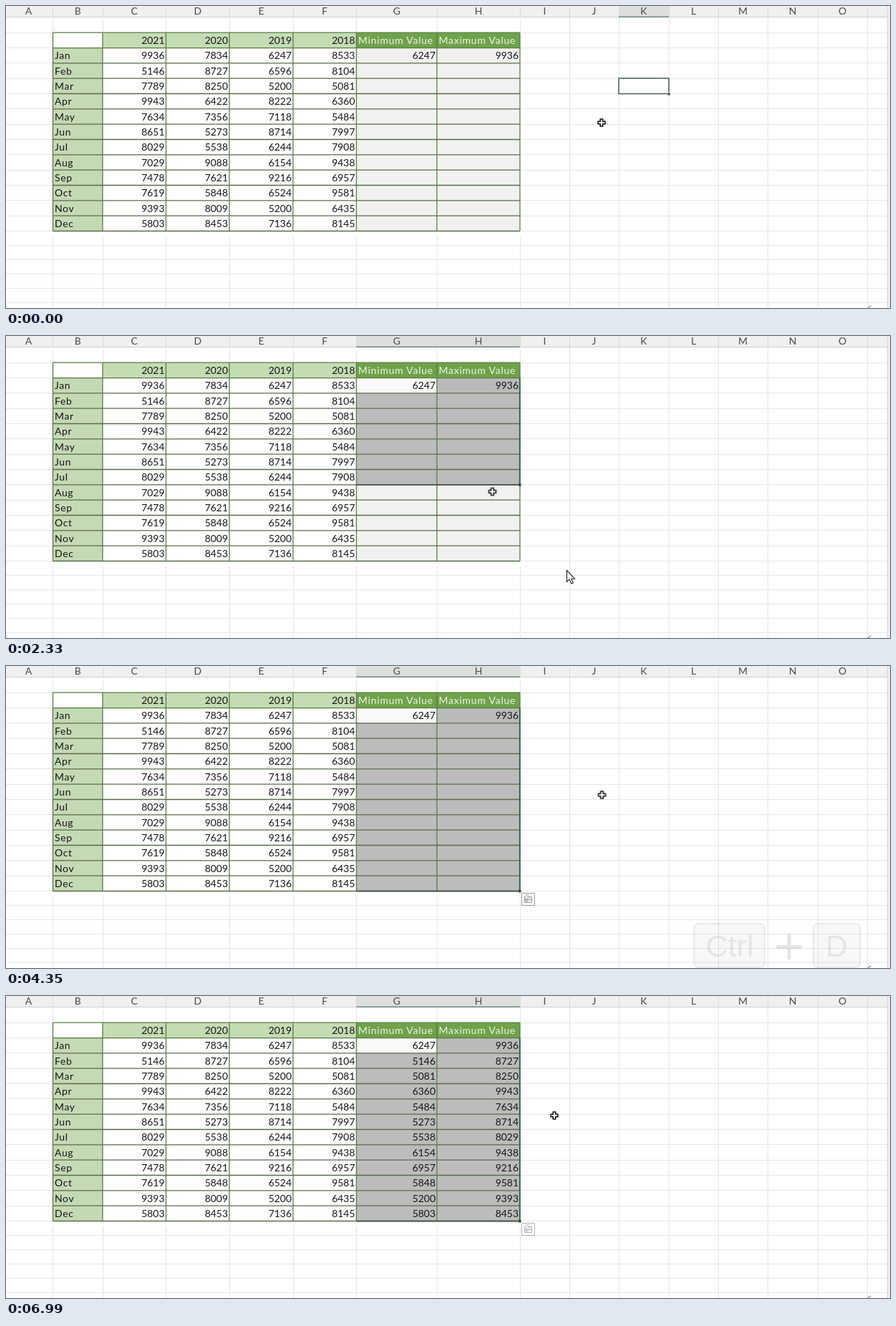
Animation of 1235 by 422 pixels, one loop 7320 ms. Source, as an HTML page:

```html
<!DOCTYPE html>
<html lang="en">
<head>
<meta charset="utf-8">
<title>Fill down</title>
<style>
html, body { margin: 0; width: 100%; height: 100%; overflow: hidden; background: #fff; }
svg { display: block; width: 1235px; height: 422px; }
text { font: 14px Lato, sans-serif; fill: #161616; }
.head { fill: #4c4c4c; text-anchor: middle; }
.num { text-anchor: end; letter-spacing: -.05px; }
.word { letter-spacing: .6px; }
.title { fill: #eef6e6; letter-spacing: .75px; }
.key rect { fill: url(#cap); stroke: #333; stroke-width: 2; }
.key text { font: 43px "Liberation Sans", Arial, sans-serif; fill: #111; text-anchor: middle; }
.key .plus { font-size: 72px; }

.anim { animation: 7.32s linear infinite; }
.start { animation-name: start; animation-timing-function: step-end; }
.first { animation-name: first; animation-timing-function: step-end; }
.second { animation-name: second; animation-timing-function: step-end; }
.arrow { animation-name: arrow; animation-timing-function: step-end; }
.filled { animation-name: filled; animation-timing-function: step-end; }
.shade { animation-name: shade; transform-origin: 0 79.87px; }
.edge { animation-name: edge; }
.tip { animation-name: tip; }
.key { animation-name: key; }
.plus-cursor { animation-name: roam; }

@keyframes start { 0% { opacity: 1 } 13.66%, 100% { opacity: 0 } }
@keyframes first { 0% { opacity: 0 } 13.66%, 100% { opacity: 1 } }
@keyframes second { 0% { opacity: 0 } 17.76%, 100% { opacity: 1 } }
@keyframes arrow { 0% { opacity: 0 } 13.66% { opacity: 1 } 56.7%, 100% { opacity: 0 } }
@keyframes filled { 0% { opacity: 0 } 72.4%, 100% { opacity: 1 } }
@keyframes shade {
  0% { transform: scaleY(0) }
  25.14% { transform: scaleY(0); animation-timing-function: steps(11) }
  37.16%, 100% { transform: scaleY(1) }
}
@keyframes edge {
  0% { transform: translateY(0) }
  25.14% { transform: translateY(0); animation-timing-function: steps(11) }
  37.16%, 100% { transform: translateY(234.63px) }
}
@keyframes tip {
  0%, 41.9% { opacity: 0 }
  42.5%, 51.78% { opacity: 1 }
  61.48%, 81.28% { opacity: .8 }
  87.02%, 100% { opacity: .6 }
}
@keyframes key {
  0%, 58.74% { opacity: 0 }
  65.57%, 86.07% { opacity: 1 }
  92.9%, 100% { opacity: 0 }
}
@keyframes roam {
  0%, 1.64% { transform: translate(832px, 163px); animation-timing-function: ease-in-out }
  10.93%, 13.66% { transform: translate(562px, 72px); animation-timing-function: ease-in-out }
  20.49%, 23.8% { transform: translate(670px, 73px) }
  35.66% { transform: translate(684px, 286px); animation-timing-function: ease-out }
  38.2%, 41.39% { transform: translate(688px, 305px); animation-timing-function: ease-in-out }
  45.22% { transform: translate(828px, 181px) }
  49.86%, 51.78% { transform: translate(827.5px, 181px); animation-timing-function: ease-in-out }
  61.48%, 81.28% { transform: translate(833px, 180px); animation-timing-function: ease-in-out }
  87.02%, 90.71% { transform: translate(855px, 161px); animation-timing-function: ease-in-out }
  95.49%, 100% { transform: translate(766px, 167px) }
}
</style>
</head>
<body>
<svg viewBox="0 0 1235 422" xmlns="http://www.w3.org/2000/svg">
  <defs>
    <linearGradient id="cap" x2="0" y2="1">
      <stop stop-color="#c6c6c6"/><stop offset="1" stop-color="#b8b8b8"/>
    </linearGradient>
  </defs>
  <g id="sheet"></g>
  <g class="anim start">
    <rect x="856" y="101" width="70" height="21.6" fill="none" stroke="#53645c" stroke-width="1.6"/>
    <path d="M924 121h4v4h-4z" fill="#3c5548" stroke="#fff" stroke-width=".6"/>
  </g>
  <g class="anim second">
    <path d="M717.8 58.5V80" stroke="#3f5f48" stroke-width="1.8"/>
    <path class="anim shade" d="M717.8 79.9V314.5" stroke="#3f5f48" stroke-width="1.8"/>
    <g class="anim edge">
      <path d="M489.5 79.9H716" stroke="#46544a" stroke-width="1.8"/>
      <path d="M716 78.2h3.6v3.6h-3.6z" fill="#2f4f3a"/>
    </g>
  </g>
  <g class="anim tip" fill="#fff" stroke="#858585">
    <path d="M720.5 317.5h18v17h-18z"/>
    <path d="M724.5 322.5h10v8h-10zM724.5 326.5h10M728 330.5v-4" fill="#eee"/>
    <path d="M727 319.5l-3 5h3l-1 4 5-6h-3l2-3z" stroke-width=".8"/>
  </g>
  <g class="anim key">
    <rect x="961.5" y="360" width="98" height="61" rx="6"/>
    <rect x="1128" y="360" width="65" height="61" rx="6"/>
    <text x="1011" y="406">Ctrl</text>
    <text class="plus" x="1094" y="416">+</text>
    <text x="1160.5" y="406">D</text>
  </g>
  <path d="M1204 422l4-3" stroke="#555" fill="none"/>
  <path class="anim arrow" d="M783.5 327.5v16l3.7-3.4 2.5 6 2.7-1.1-2.5-5.8h4.6z" fill="#fff" stroke="#222" stroke-width="1.1"/>
  <path class="anim plus-cursor" d="M-1.8-5h3.6v3.2H5v3.6H1.8V5h-3.6V1.8H-5v-3.6h3.2z" fill="#fff" stroke="#111" stroke-width="1.5"/>
</svg>
<script>
const cols = [0, 65.5, 135, 223.5, 312, 401, 489.5, 602, 718, 787, 856, 926, 995, 1064, 1134, 1203];
const centers = cols.map((x, i) => i ? (x + cols[i + 1]) / 2 : 31.5);
const TOP = 37.2, ROW = 21.33, BOTTOM = TOP + 13 * ROW;
const months = "Jan Feb Mar Apr May Jun Jul Aug Sep Oct Nov Dec".split(" ");
const data = [
  [9936, 7834, 6247, 8533], [5146, 8727, 6596, 8104], [7789, 8250, 5200, 5081],
  [9943, 6422, 8222, 6360], [7634, 7356, 7118, 5484], [8651, 5273, 8714, 7997],
  [8029, 5538, 6244, 7908], [7029, 9088, 6154, 9438], [7478, 7621, 9216, 6957],
  [7619, 5848, 6524, 9581], [9393, 8009, 5200, 6435], [5803, 8453, 7136, 8145]
];
const out = [];
const rowY = i => TOP + i * ROW;
const rect = (x, y, r, b, fill, cls = "") =>
  out.push(`<rect class="${cls}" x="${x}" y="${y}" width="${r - x}" height="${b - y}" fill="${fill}"/>`);
const line = (d, color, w = 1, cls = "") =>
  out.push(`<path class="${cls}" d="${d}" stroke="${color}" stroke-width="${w}" fill="none"/>`);
const text = (x, y, s, cls) => out.push(`<text x="${x}" y="${y}" class="${cls}">${s}</text>`);

// Grid
const gridY = [];
for (let i = 0; i <= 13; i++) gridY.push(rowY(i));
for (let y = 334.5; y < 420; y += 20) gridY.push(y);
gridY.forEach(y => line(`M0 ${Math.floor(y) + .5}H1231`, "#e6e6e6"));
cols.slice(1).forEach(x => {
  const snap = Math.floor(x) + .5;
  line(x < 719 ? `M${snap} 19V37M${snap} 322V422` : `M${snap} 16V422`, "#e4e4e4");
});

// Column headings
rect(0, 0, 1235, 15, "#f0f0f0");
rect(1231, 0, 1235, 422, "#eeeeee");
line("M1231.5 0V422", "#d8d8d8");
line("M0 15.5H1231", "#cfcfcf");
cols.slice(1).forEach(x => line(`M${Math.floor(x) + .5} 1V15`, "#d9d9d9"));
[[10, "start"], [6, "first"], [7, "second"]].forEach(([c, cls]) => {
  rect(cols[c], 0, cols[c + 1], 15, "#dcdfdc", "anim " + cls);
  line(`M${cols[c]} 15.3H${cols[c + 1]}`, "#75867b", 1.5, "anim " + cls);
});
centers.slice(0, 15).forEach((x, i) => text(x, 11.6, String.fromCharCode(65 + i), "head"));

// Cell fills
rect(cols[1], TOP, cols[8], BOTTOM, "#fff");
rect(cols[1], rowY(1), cols[2], BOTTOM, "#c4dab4");
rect(cols[2], TOP, cols[6], rowY(1), "#c4dcb3");
rect(cols[6], TOP, cols[8], rowY(1), "#6fa24a");
rect(cols[6], rowY(1), cols[8], BOTTOM, "#f1f2f0");
rect(cols[6], rowY(1), cols[7], rowY(2), "#f9f9f8", "anim first");
rect(cols[7], rowY(1), cols[8], rowY(2), "#bbbabb", "anim second");
rect(cols[6], rowY(2), cols[8], BOTTOM, "#bcbcbc", "anim shade");

// Borders
for (let i = 0; i <= 13; i++) line(`M${cols[1]} ${rowY(i)}H${cols[8]}`, i < 2 ? "#567a40" : "#596b4c", 1.3);
cols.slice(1, 9).forEach(x => line(`M${x} ${TOP}V${BOTTOM}`, "#5a7b47", 1.3));

// Contents
const base = i => 53 + i * ROW;
const num = (c, r, v, cls = "") => text(cols[c + 1] - 2, base(r), v, "num " + cls);
[2021, 2020, 2019, 2018].forEach((y, i) => num(i + 2, 0, y));
text(492, base(0), "Minimum Value", "title");
text(604.5, base(0), "Maximum Value", "title");
data.forEach((row, i) => {
  text(68, base(i + 1), months[i], "word");
  row.forEach((v, j) => num(j + 2, i + 1, v));
  const cls = i ? "anim filled" : "";
  num(6, i + 1, Math.min(...row), cls);
  num(7, i + 1, Math.max(...row), cls);
});
document.getElementById("sheet").innerHTML = out.join("");
</script>
</body>
</html>
```
